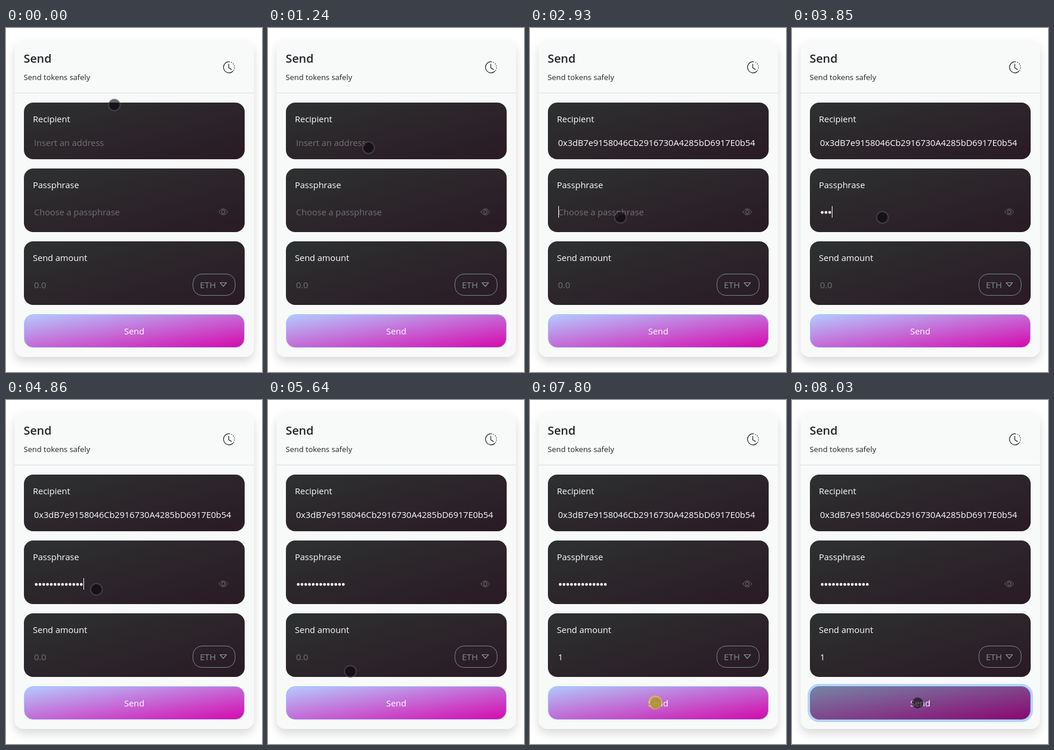
Recreate the animation shown at these times as an HTML page. Size 443 px wide and 595 px high, loop 9.12 s.

```html
<!DOCTYPE html>
<html lang="en">
<head>
<meta charset="utf-8">
<title>Send tokens</title>
<style>
  html, body { margin: 0; width: 100%; height: 100%; overflow: hidden; background: #fff; }
  svg { display: block; }
  text { font: 500 15px "Open Sans", "Noto Sans", sans-serif; fill: #fff; }
  .hint { font-weight: 400; fill: #727175; }
  .dark { fill: #212529; }
  .line { fill: none; stroke-linejoin: round; stroke-linecap: round; }
</style>
</head>
<body>
<svg width="443" height="595" viewBox="0 0 443 595">
  <defs>
    <linearGradient id="panelFill" x2="1" y2="1">
      <stop stop-color="#2d3131"/><stop offset="1" stop-color="#2a1a24"/>
    </linearGradient>
    <linearGradient id="buttonFill" x2="1" y2="1">
      <stop stop-color="#b4ccff"/><stop offset="1" stop-color="#d608ad"/>
    </linearGradient>
    <filter id="shadow" x="-10%" y="-10%" width="120%" height="120%">
      <feDropShadow dx="0" dy="8" stdDeviation="8" flood-opacity=".15"/>
    </filter>
  </defs>

  <rect x="15" y="21" width="414" height="548" rx="16" fill="#f8faf9" filter="url(#shadow)"/>
  <path d="M15 112.5H429" stroke="#dcdde8"/>
  <text class="dark" x="30.5" y="60" style="font-size:20.3px;font-weight:600">Send</text>
  <text class="dark" x="30.5" y="90" style="font-size:13.3px;font-weight:400">Send tokens safely</text>

  <g class="line" stroke="#212529" stroke-width="1.25" transform="translate(386 68)">
    <path d="M0-9.5A9.5 9.5 0 1 0 6.7 6.7"/>
    <path d="M0-9.5A9.5 9.5 0 0 1 6.7 6.7" stroke-dasharray="1.6 2.2" stroke-linecap="butt"/>
    <path d="M-.5-5.5V1L4 3.6"/>
  </g>

  <g id="panels"></g>
  <path id="dots" class="line" stroke="#fff" stroke-width="4.8"/>

  <g class="line" stroke="#737278" transform="translate(376 318)">
    <path d="M-7.5 0s2.8-5 7.5-5 7.5 5 7.5 5-2.8 5-7.5 5-7.5-5-7.5-5z"/>
    <circle r="3"/>
  </g>
  <g class="line" stroke="#75879a">
    <rect x="323.5" y="425.5" width="73" height="37" rx="15.5"/>
    <path d="M370.5 440.5h11l-5.5 6.5z" stroke="#8798a8" stroke-width="1.2"/>
  </g>
  <text x="335.5" y="450" style="font-weight:400;fill:#7b8c9c">ETH</text>

  <rect id="ring" x="29" y="493" width="386" height="62" rx="18" fill="none" stroke="#b6d4fe" stroke-width="4"/>
  <rect x="31.5" y="495.5" width="381" height="57" rx="15.5" fill="url(#buttonFill)" stroke="#9ec5fe"/>
  <rect id="shade" x="31" y="495" width="382" height="58" rx="16"/>
  <text x="222" y="530" text-anchor="middle">Send</text>

  <rect id="caret" width="1" height="20" fill="#fff"/>
  <g id="pointer">
    <circle r="10" fill="rgba(8,5,12,.6)" stroke="rgba(110,106,122,.42)" stroke-width="2"/>
    <circle id="highlight" cx="-.7" cy="-.8" r="12" fill="#ebcd32" opacity=".62"/>
  </g>
</svg>
<script>
const LOOP = 9120, TICK = 77.2;  // the picture refreshes once per tick
const ADDRESS = "0x3dB7e9158046Cb2916730A4285bD6917E0b54";
const PASTE = 1460, TYPE_START = 3465, TYPE_END = 4850, SUBMIT = 7865;
const LETTERS = 13, DOT = 6.5, BLINK = 500;
const CLICKS = [460, 2385, 6090, 7790], HOLD = 155;

const fields = [
  { label: "Recipient", hint: "Insert an address", height: 98, focus: 690,
    value: t => t < PASTE ? "" : ADDRESS },
  { label: "Passphrase", hint: "Choose a passphrase", height: 110, focus: 2460,
    value: t => "•".repeat(typedLetters(t)) },
  { label: "Send amount", hint: "0.0", height: 110, focus: 6250,
    value: t => t < 6250 ? "" : "1" }
];
const [recipient, passphrase] = fields;

// Where the pointer goes and when; bow bends the path to the right
const home = { x: 187.5, y: 133 };
const moves = [
  { start: 0, end: 230, x: 174, y: 207 },
  { start: 1850, end: 2235, x: 160.5, y: 324.5 },
  { start: 2700, end: 2930, x: 156.5, y: 327.5 },
  { start: 5320, end: 5630, x: 142.5, y: 469.5, bow: 33 },
  { start: 5630, end: 5940, x: 141.5, y: 452.5 },
  { start: 6790, end: 7480, x: 217.5, y: 524 }
];

const $ = id => document.getElementById(id);
const set = (el, attrs) => { for (const k in attrs) el.setAttribute(k, attrs[k]); };
const progress = (t, start, end) => Math.min(1, Math.max(0, (t - start) / (end - start)));

// Typing speeds up slightly
function typedLetters(t) {
  if (t < TYPE_START) return 0;
  return 1 + Math.floor((LETTERS - 1) * progress(t, TYPE_START, TYPE_END) ** 1.2);
}

function buildPanels() {
  let top = 129;
  for (const f of fields) {
    f.middle = top + f.height / 2;
    $("panels").insertAdjacentHTML("beforeend", `
      <rect x="31" y="${top}" width="382" height="${f.height}" rx="16" fill="url(#panelFill)"/>
      <text x="46.5" y="${top + 34}">${f.label}</text>
      <text x="48.5" y="${f.middle + 26}"></text>`);
    f.text = $("panels").lastElementChild;
    top += f.height + 16;
  }
}

function drawField(f, t) {
  const value = f.value(t), masked = f === passphrase;
  f.text.textContent = value ? (masked ? "" : value) : f.hint;
  f.text.setAttribute("class", value ? "" : "hint");
  f.width = !value ? 0 : masked ? value.length * DOT : f.text.getComputedTextLength();
  if (masked) set($("dots"), {
    d: value && `M52.3 319h${f.width - DOT + 0.1}`,
    "stroke-dasharray": `0 ${DOT}`
  });
}

// The caret shows at once after each input, then blinks
function drawCaret(t) {
  const f = fields.findLast(f => t >= f.focus);
  let last = f ? f.focus : 0;
  if (f === recipient && t >= PASTE) last = PASTE;
  if (f === passphrase && t >= TYPE_START) last = Math.min(t, TYPE_END);
  const on = f && t < SUBMIT && (t - last) % (2 * BLINK) < BLINK;
  set($("caret"), { opacity: on ? 1 : 0 });
  if (on) set($("caret"), { x: Math.round(49 + f.width), y: f.middle + 10 });
}

function pointerAt(t) {
  let { x, y } = home;
  for (const m of moves) {
    const p = progress(t, m.start, m.end), eased = p * p * (3 - 2 * p);
    x += (m.x - x) * eased + (m.bow || 0) * Math.sin(Math.PI * p);
    y += (m.y - y) * eased;
  }
  return `translate(${x} ${y})`;
}

function draw(t) {
  for (const f of fields) drawField(f, t);
  drawCaret(t);

  const active = progress(t, SUBMIT - TICK, SUBMIT + 150);
  set($("ring"), { opacity: active });
  set($("shade"), { opacity: 0.35 * active });

  set($("pointer"), { transform: pointerAt(t) });
  const pressed = CLICKS.some(c => t >= c && t < c + HOLD);
  set($("highlight"), { visibility: pressed ? "visible" : "hidden" });
}

function frame() {
  const t = performance.now() % LOOP;
  draw(Math.floor((t + 8) / TICK) * TICK);
  requestAnimationFrame(frame);
}
buildPanels();
frame();
</script>
</body>
</html>
```
